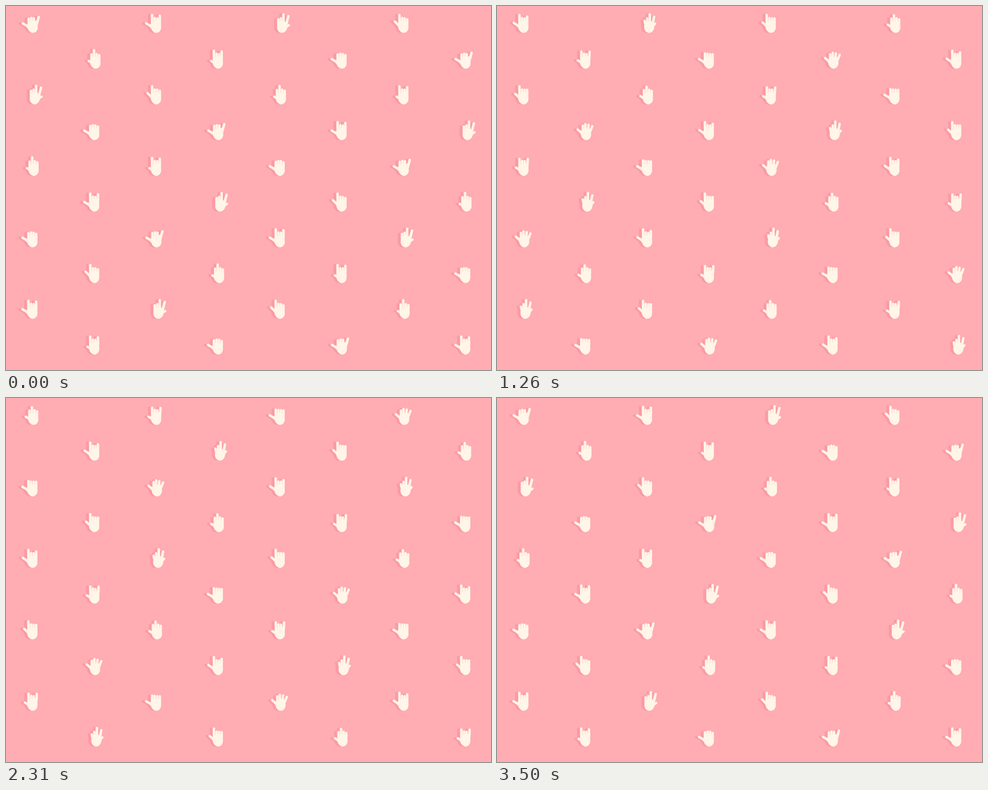
An HTML page with a canvas that plays this animation: 800 px wide and 600 px high, repeating every 3.71 s.

```html
<!DOCTYPE html>
<html lang="en">
<head>
<meta charset="utf-8">
<title>Hand signs</title>
<style>
  html, body { margin: 0; width: 100%; height: 100%; overflow: hidden; background: #ffacb2; }
  canvas { display: block; }
</style>
</head>
<body>
<canvas id="stage" width="800" height="600"></canvas>
<script>
const ctx = document.getElementById('stage').getContext('2d');
const LOOP = 3710, TICK = 70, PERIOD = 525, MORPH = 350;
const COLORS = { back: '#ffacb2', shadow: '#fa9ba5', hand: '#fff5e8' };

const mix = (a, b, k) => a + (b - a) * k;
const ease = k => k < 0.5 ? 4 * k ** 3 : 1 - (2 - 2 * k) ** 3 / 2;

// One digit per finger, thumb first: 0 folded, 1 raised, 2 spread outwards
function makeSign(digits, { shift = 0, mirrored = false } = {}) {
  const fingers = [...digits].map((digit, i) => {
    const state = Number(digit);
    if (i === 0) {
      const reach = state ? 14.7 : 8.7, angle = state === 1 ? 0.77 : 0.52;
      return [40, 36, 40 - reach * Math.cos(angle), 36 - reach * Math.sin(angle)];
    }
    const x = 37 + 4.25 * (i - 1);
    const arch = 0.7 * (i - 2.2) ** 2 - 1;
    const spread = state === 2 ? 1 : 0;
    const outwards = i < 2 ? -1 : 1;
    return [x, 32, x + outwards * spread * 3.8, (state ? 14.8 : 20.8) + arch + spread * 2];
  });
  const flip = x => mirrored ? 91 - x : x + shift;
  const placed = fingers.map(([x, y, tipX, tipY]) => [flip(x), y, flip(tipX), tipY]);
  return {
    fingers: mirrored ? placed.reverse() : placed,
    palmX: flip(43.4),
    tilt: mirrored ? 0.25 : -0.25,
  };
}

const SIGNS = [
  makeSign('20002', { shift: 0.5 }),
  makeSign('21001'),
  makeSign('02100', { mirrored: true }),
  makeSign('11000'),
  makeSign('00100', { shift: 2 }),
  makeSign('01001'),
  makeSign('20000'),
];

const morph = (a, b, k) => ({
  fingers: a.fingers.map((f, i) => f.map((v, j) => mix(v, b.fingers[i][j], k))),
  palmX: mix(a.palmX, b.palmX, k),
  tilt: mix(a.tilt, b.tilt, k),
});

function drawHand({ fingers, palmX, tilt }, x, y, color) {
  ctx.save();
  ctx.translate(x, y);
  ctx.fillStyle = ctx.strokeStyle = color;
  ctx.lineCap = ctx.lineJoin = 'round';
  ctx.lineWidth = 4;
  ctx.beginPath();
  for (const [rootX, rootY, tipX, tipY] of fingers) {
    ctx.moveTo(rootX, rootY);
    ctx.lineTo(tipX, tipY);
  }
  ctx.stroke();

  ctx.beginPath();
  ctx.ellipse(palmX, 34.4, 8.5, 10, tilt, 0, 2 * Math.PI);
  ctx.fill();

  // Skin between the outer fingers and the heel of the hand
  ctx.beginPath();
  for (const [rootX, rootY, tipX, tipY] of [fingers[0], fingers[4]]) {
    ctx.lineTo(mix(rootX, tipX, 0.5), mix(rootY, tipY, 0.5));
  }
  ctx.lineTo(palmX, 42);
  ctx.closePath();
  ctx.fill();
  ctx.stroke();
  ctx.restore();
}

function render(time) {
  const t = Math.floor(time % LOOP / TICK) * TICK;
  const step = Math.floor(t / PERIOD);
  const k = ease(Math.min(1, (t - step * PERIOD) / MORPH));
  const hands = SIGNS.map((sign, i) => morph(sign, SIGNS[(i + 5) % 7], k));

  ctx.fillStyle = COLORS.back;
  ctx.fillRect(0, 0, 800, 600);
  for (let row = 0; row < 10; row++) {
    const odd = row % 2;
    for (let col = 0; col < 4; col++) {
      const hand = hands[(row + 3 * odd + col + 5 * step) % 7];
      const x = col * 204 + odd * 102, y = row * 58.9;
      drawHand(hand, x - 5, y, COLORS.shadow);
      drawHand(hand, x, y, COLORS.hand);
    }
  }
}

function loop() {
  render(performance.now());
  requestAnimationFrame(loop);
}
loop();
</script>
</body>
</html>
```
